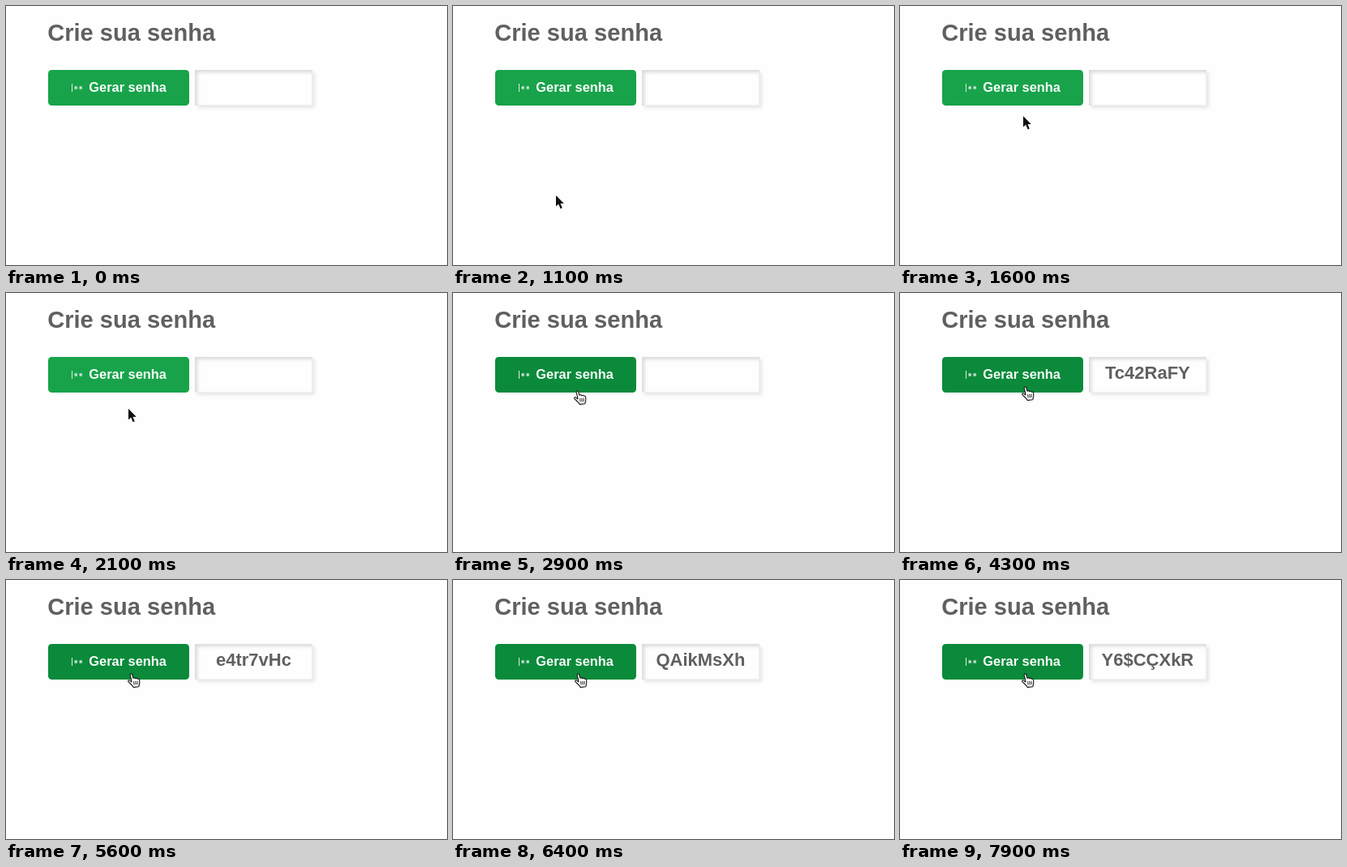
Animation of 544 by 320 pixels, one loop 8 s. Source, as an HTML page:

```html
<!DOCTYPE html>
<html lang="pt-BR">
<head>
<meta charset="utf-8">
<title>Crie sua senha</title>
<style>
  html, body { margin: 0; width: 100%; height: 100%; overflow: hidden; background: #fefefe; }
  .field {
    position: absolute; left: 233px; top: 79px; width: 145px; height: 44px; background: #fefefe;
    box-shadow: inset 3px 3px 4px #dadada, inset -1px -1px 2px #f2f2f2, 3px 3px 4px #e6e6e6;
  }
  svg { position: absolute; left: 0; top: 0; display: block; }
  text { font-family: "Liberation Sans", Arial, sans-serif; font-weight: bold; fill: #606060; }
  .title { font-size: 29.1px; }
  .label { font-size: 16.4px; fill: #f8fcf9; }
  .password { font-size: 22px; text-anchor: middle; }
  .icon { stroke: #d9f0e1; stroke-width: 1; fill: none; }
</style>
</head>
<body>
<div class="field"></div>
<svg width="544" height="320" viewBox="0 0 544 320">
  <defs>
    <path id="star" d="M0-2.3V2.3M-2-1.2L2 1.2M2-1.2L-2 1.2"/>
  </defs>
  <text class="title" x="51.2" y="43">Crie sua senha</text>
  <rect id="button" x="52" y="79" width="174" height="44" rx="4.5"/>
  <g class="icon">
    <path d="M81.5 96V106"/>
    <use href="#star" x="86.2" y="101"/>
    <use href="#star" x="92.2" y="101"/>
  </g>
  <text class="label" x="102.3" y="106">Gerar senha</text>
  <text class="password" id="password" x="305.4" y="106"></text>
  <g id="cursor">
    <path id="arrow" fill="#111" stroke="#fff" stroke-width=".9" paint-order="stroke"
      d="M0 0V13.6L3.2 10.8L5.6 16.4L7.8 15.4L5.5 10H9.8Z"/>
    <g id="hand" transform="translate(-4 -1)" stroke="#111" stroke-linejoin="round" stroke-linecap="round">
      <path fill="#fff" stroke-width="1.1" d="M4.7 9L3.2 2.7C2.9.8 5.2.3 5.7 2L7 6.3C8 5.4 9.2 5.6 9.6 6.7
        C10.6 5.9 11.8 6.2 12.1 7.2C13.2 6.7 14.4 7.2 14.6 8.4L14.8 12C14.8 14 14 15 13.8 16.8L7.2 17.6
        C6.6 15.6 3.4 13.2 1 10.8C0 9.6 1.4 8.3 2.6 9.1L4.9 11Z"/>
      <path fill="none" stroke-width=".9" d="M7.6 10.6L8.1 14.2M9.8 10.4L10.2 14M12 10.2L12.2 13.8"/>
    </g>
  </g>
</svg>
<script>
  const LOOP = 8000, TICK = 100;
  const el = id => document.getElementById(id);

  // Rows are [time, value, ...].
  const path = [
    [600, -3, 247], [800, 42, 248], [1000, 110, 243], [1100, 127, 234],
    [1300, 145, 178], [1400, 149, 157], [1500, 151, 150], [1700, 153, 122],
    [1900, 152, 124], [2100, 151, 143], [2300, 151, 157], [2500, 151, 157],
    [2800, 153, 122], [3300, 154, 118], [3500, 154, 116]
  ];
  const hover = [[1600, 0], [1800, 1], [1900, 1], [2100, 0], [2700, 0], [2900, 1]];
  const passwords = [
    [0, ""], [3700, "B$e84UKs"], [4300, "Tc42RaFY"], [4900, "n5tkE2a8"], [5600, "e4tr7vHc"],
    [6000, "x9Kç2fb5"], [6400, "QAikMsXh"], [6800, "P8mVae3k"], [7200, "WçD4uH7e"],
    [7600, "GNa5Rq2X"], [7900, "Y6$CÇXkR"]
  ];

  function sample(rows, t) {
    const next = rows.findIndex(row => row[0] > t);
    if (next === 0) return rows[0].slice(1);
    if (next < 0) return rows.at(-1).slice(1);
    const a = rows[next - 1], b = rows[next];
    const k = (t - a[0]) / (b[0] - a[0]);
    return a.slice(1).map((v, i) => v + (b[i + 1] - v) * k);
  }

  const mix = (a, b, k) => `rgb(${a.map((v, i) => Math.round(v + (b[i] - v) * k))})`;
  const show = (id, on) => el(id).setAttribute("visibility", on ? "visible" : "hidden");

  function render(t) {
    const [x, y] = sample(path, t);
    const [shade] = sample(hover, t);
    const visible = t >= path[0][0], over = y < 123;
    el("cursor").setAttribute("transform", `translate(${Math.round(x)} ${Math.round(y)})`);
    show("arrow", visible && !over);
    show("hand", visible && over);
    el("button").setAttribute("fill", mix([24, 163, 74], [10, 138, 58], shade));
    el("password").textContent = passwords.findLast(row => row[0] <= t)[1];
  }

  const start = performance.now();
  function frame() {
    const t = (performance.now() - start) % LOOP;
    render(Math.floor(t / TICK) * TICK);
    requestAnimationFrame(frame);
  }
  frame();
</script>
</body>
</html>
```
